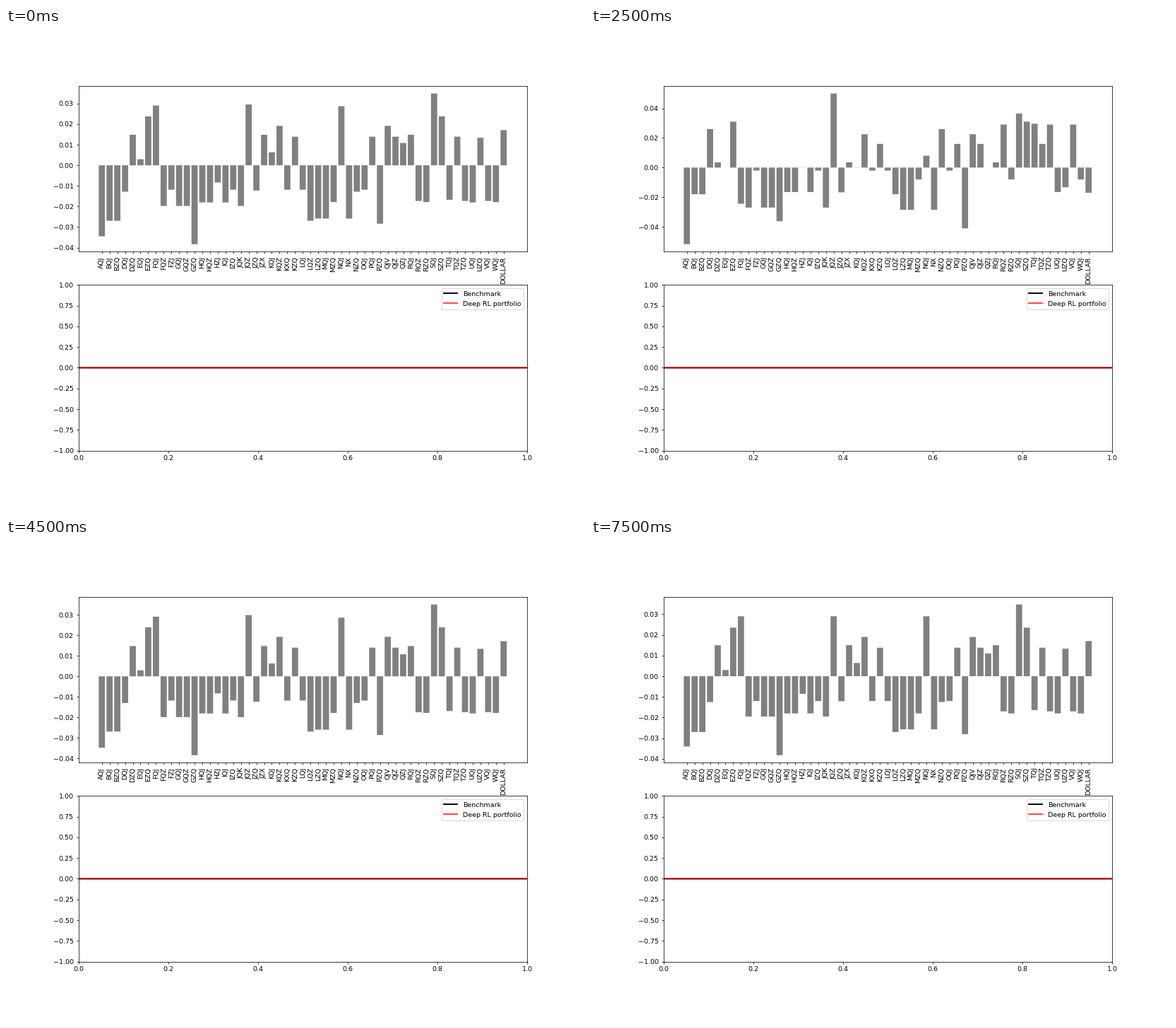
These frames come from a looping animation (820x683 px, 8 s). A matplotlib script:

```python
import numpy as np
import matplotlib.pyplot as plt
from matplotlib.animation import FuncAnimation

W, H, DPI = 820, 683, 820 / 12

# Groups of holdings: weight in thousandths when calm and when stressed,
# the stress at which they change sides, and the members
BOOK = [
    (34.7, 36.5, 1, "SQJ"),
    (29, 50, 1, "JQZ"),
    (23.5, 31, 1, "EZQ SZQ"),
    (19, 22.5, 1, "KQZ QJV"),
    (13.8, 16, 1, "KZQ PQJ QJZ TQZ"),
    (29, 8, 1, "NQJ"),
    (15, 3.5, 1, "DZQ JZX RQJ"),
    (6.4, 0.1, 1, "KQJ"),
    (-34, -51.7, 1, "AQJ"),
    (-38.2, -36.2, 1, "GZQ"),
    (-28, -41, 1, "PZQ"),
    (-25.7, -28.5, 1, "LZQ MQJ NX"),
    (-27, -18, 1, "BQJ BZQ LQZ"),
    (-19.5, -27, 1, "FQZ GQJ GQZ JQK"),
    (-18, -16.5, 1, "HQJ HQZ IQJ UQJ"),
    (-18, -8, 1, "MZQ RZQ WQJ"),
    (-12, -2, 1, "FZJ IZQ KXQ LQJ OQJ"),
    (-12.1, -16.7, 1, "JZQ"),
    (-16.4, 29.6, 0.05, "TQJ"),
    (-17, 29, 0.15, "RQZ TZQ VQJ"),
    (-12.5, 26, 0.3, "DQJ NZQ"),
    (13.3, -13.3, 0.15, "UZQ"),
    (17, -17, 0.3, "DOLLAR"),
    (29, -24.4, 0.6, "FQJ"),
    (-8.5, 0.1, 0.15, "HZJ"),
    (3, 0, 0.15, "EQJ"),
    (11, 0, 0.15, "QZJ"),
]
HOLDINGS = {name: row[:3] for row in BOOK for name in row[3].split()}
NAMES = sorted(HOLDINGS, key=lambda name: (name == "DOLLAR", name))
CALM, WILD, CROSS = np.array([HOLDINGS[name] for name in NAMES]).T

# Market stress at each step
STRESS = [0.02, 0.03, 0.22, 0.32, 0.88, 1, 0.2, 0.07,
          0.04, 0.03, 0.01, 0, 0.25, 0.22, 0, 0]


def weights(s):
    """Sizes slide from calm to wild, swelling a little on the way."""
    side = np.sign(np.where(s >= CROSS, WILD, CALM))
    size = (1 - s) * np.abs(CALM) + s * np.abs(WILD)
    return side * size * (1 + 0.25 * s * (1 - s)) / 1000


fig, (bars_ax, line_ax) = plt.subplots(
    2, 1, figsize=((W + 0.01) / DPI, (H + 0.01) / DPI), dpi=DPI)
fig.subplots_adjust(left=0.125, right=0.9, bottom=0.125, top=0.88, hspace=0.2)

line_ax.axhline(0, color="black", lw=2, snap=False, label="Benchmark")
line_ax.axhline(0, color="red", lw=2, alpha=0.75, snap=False,
                label="Deep RL portfolio")
line_ax.set(xlim=(0, 1), ylim=(-1, 1))
line_ax.legend(loc="upper right")


def draw(i):
    bars_ax.clear()
    x = np.arange(len(NAMES))
    bars_ax.bar(x, weights(STRESS[i]), color="grey", snap=False)
    bars_ax.set_xticks(x, NAMES, rotation="vertical")
    return []


anim = FuncAnimation(fig, draw, frames=len(STRESS), interval=500,
                     init_func=lambda: draw(0), repeat=True, repeat_delay=0)
plt.show()
```
